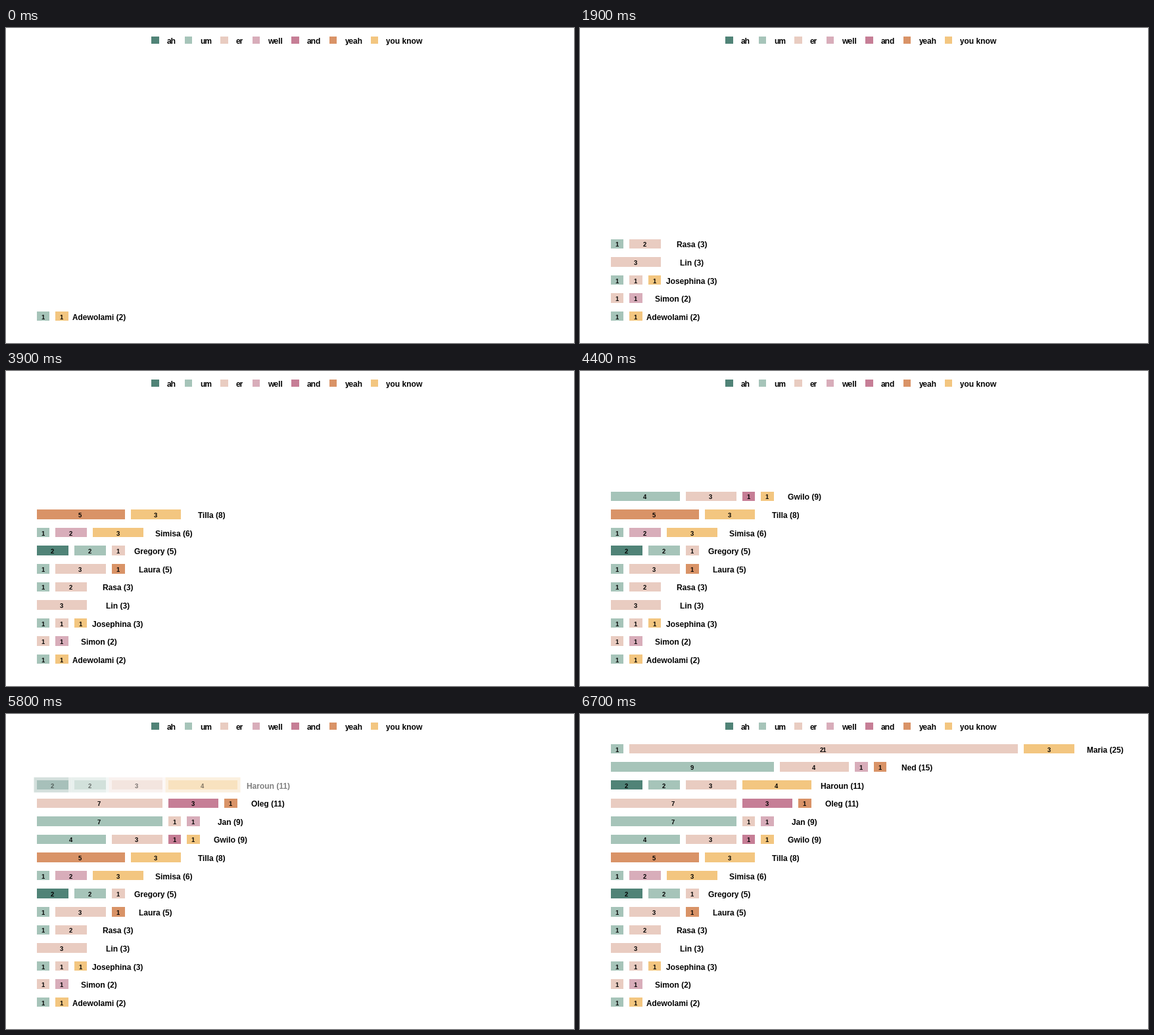
A matplotlib script that plays this animation: 864 by 480 pixels, repeating every 7 s.

```python
from math import floor

import matplotlib.pyplot as plt
from matplotlib.animation import FuncAnimation
from matplotlib.patches import Rectangle

W, H, DPI = 864, 480, 100
N_FRAMES, INTERVAL = 70, 100

plt.rcParams["font.family"] = "Liberation Sans"
plt.rcParams["font.weight"] = "bold"
plt.rcParams["text.hinting"] = "native"

COLORS = {
    "ah": "#508377",
    "um": "#A6C4B9",
    "er": "#E9CCC1",
    "well": "#D8ADBA",
    "and": "#C67E96",
    "yeah": "#D99367",
    "you know": "#F3C680",
}
LEGEND_X = [221.4, 272, 326.4, 375, 434.5, 492, 555]

# Bottom row first: speaker and filler word counts
ROWS = [
    ("Adewolami", {"um": 1, "you know": 1}),
    ("Simon", {"er": 1, "well": 1}),
    ("Josephina", {"um": 1, "er": 1, "you know": 1}),
    ("Lin", {"er": 3}),
    ("Rasa", {"um": 1, "er": 2}),
    ("Laura", {"um": 1, "er": 3, "yeah": 1}),
    ("Gregory", {"ah": 2, "um": 2, "er": 1}),
    ("Simisa", {"um": 1, "well": 2, "you know": 3}),
    ("Tilla", {"yeah": 5, "you know": 3}),
    ("Gwilo", {"um": 4, "er": 3, "and": 1, "you know": 1}),
    ("Jan", {"um": 7, "er": 1, "well": 1}),
    ("Oleg", {"er": 7, "and": 3, "yeah": 1}),
    ("Haroun", {"ah": 2, "um": 2, "er": 3, "you know": 4}),
    ("Ned", {"um": 9, "er": 4, "well": 1, "yeah": 1}),
    ("Maria", {"um": 1, "er": 21, "you know": 3}),
]
# Frame at which each row is half faded in
STARTS = [-1] + [3 + 5 * k for k in range(12)] + [62, 66]

X0, UNIT = 42.12, 28.58
Y0, PITCH = 439.2, 27.58
GAP = 9  # white outline that separates the bars

fig = plt.figure(figsize=(W / DPI, H / DPI), dpi=DPI, facecolor="white")
ax = fig.add_axes([0, 0, 1, 1])
ax.set_xlim(0, W)
ax.set_ylim(H, 0)
ax.axis("off")


def px(size):
    return size * 72 / DPI


def add_text(x, y, s, size, ha="center"):
    return ax.text(x, y, s, fontsize=px(size), ha=ha, va="baseline",
                   color="black")


def add_box(left, top, right, bottom, color, outline=0):
    box = Rectangle((left, top), right - left, bottom - top, facecolor=color,
                    edgecolor="white" if outline else "none",
                    linewidth=px(outline), snap=False)
    return ax.add_patch(box)


def add_row(index, name, counts):
    yc = Y0 - PITCH * index
    top, bottom = floor(yc - 11.8) + 0.5, floor(yc + 11.73) + 0.5
    text_y = round(yc + 0.5)
    artists, total = [], 0
    for word, n in counts.items():
        left, right = X0 + UNIT * total, X0 + UNIT * (total + n)
        artists.append(add_box(floor(left) + 0.5, top, floor(right) + 0.5,
                               bottom, COLORS[word], GAP))
        artists.append(add_text((left + right) / 2 - 0.8, text_y + 4,
                                str(n), 9.5))
        total += n
    artists.append(add_text(X0 + UNIT * total + 42.2, text_y + 5,
                            f"{name} ({total})", 12))
    return artists


for x, (word, color) in zip(LEGEND_X, COLORS.items()):
    add_box(floor(x), 13, floor(x + 11.6), 24, color)
    add_text(x + 23.5, 24, word, 12, ha="left")

rows = [add_row(i, *row) for i, row in enumerate(ROWS)]


def update(frame):
    for start, artists in zip(STARTS, rows):
        alpha = min(max((frame - start + 1) / 2, 0), 1)
        for artist in artists:
            artist.set_visible(alpha > 0)
            artist.set_alpha(alpha)
    return [artist for artists in rows for artist in artists]


anim = FuncAnimation(fig, update, frames=N_FRAMES, interval=INTERVAL,
                     repeat=True, repeat_delay=0)
plt.show()
```
